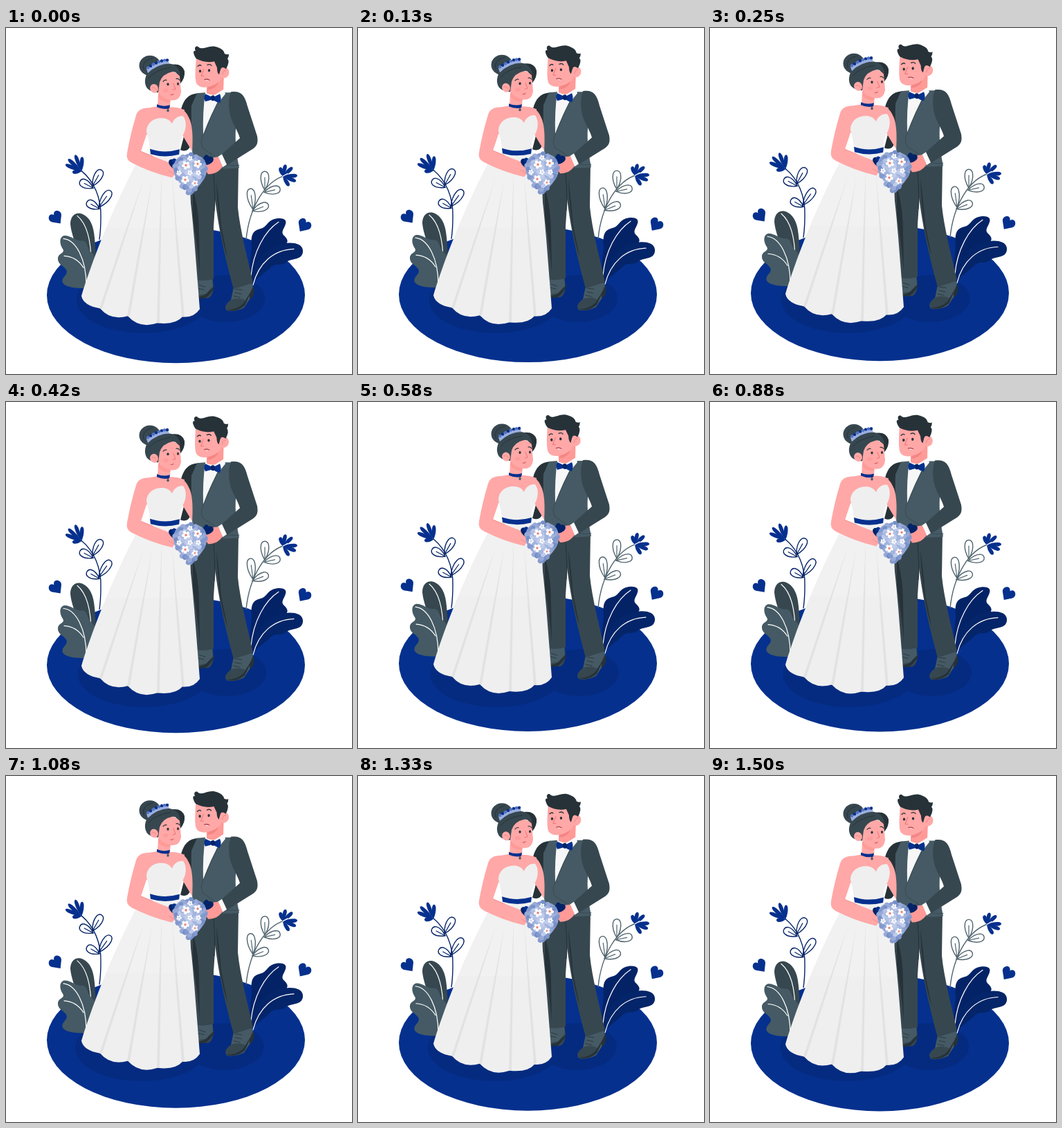
These frames come from a looping animation (500 px wide and 500 px high, 1.54 s). An HTML page with a canvas:

```html
<!DOCTYPE html>
<html lang="en">
<head>
<meta charset="utf-8">
<title>Wedding couple</title>
<style>
html, body { margin: 0; width: 100%; height: 100%; overflow: hidden; background: #fff; }
canvas { display: block; width: 500px; height: 500px; }
</style>
</head>
<body>
<canvas id="stage" width="500" height="500"></canvas>
<script>
const ctx = document.getElementById('stage').getContext('2d');
const LOOP = 1540, STEP = LOOP / 37, LOWEST = 1475, LIFT = 9;
const BLUE = '#05308e', SHADE = '#052b80', NAVY = '#042367', NAVY2 = '#042569';
const SLATE = '#455a64', DARK = '#37474f', BLACK = '#263238';
const SKIN = '#ffa8a7', BLUSH = '#ff9a97', DRESS = '#efefef', FOLD = '#e2e2e2';

const fill = (color, d) => { ctx.fillStyle = color; ctx.fill(new Path2D(d)); };
function line(color, width, d) {
  ctx.strokeStyle = color;
  ctx.lineWidth = width;
  ctx.lineCap = ctx.lineJoin = 'round';
  ctx.stroke(new Path2D(d));
}
function oval(color, x, y, rx, ry = rx, turn = 0) {
  ctx.fillStyle = color;
  ctx.beginPath();
  ctx.ellipse(x, y, rx, ry, turn, 0, Math.PI * 2);
  ctx.fill();
}
function at(x, y, turn, draw) {
  ctx.save();
  ctx.translate(x, y);
  ctx.rotate(turn);
  draw();
  ctx.restore();
}

// Teardrop running from a base point to a rounded tip.
function petal(x, y, tipX, tipY, width, paint) {
  const len = Math.hypot(tipX - x, tipY - y);
  at(x, y, Math.atan2(tipY - y, tipX - x), () => paint(
    `M0 0C${len * .3} ${-width * .45} ${len * .55} ${-width * .6} ${len * .8} ${-width * .5}` +
    `C${len * 1.07} ${-width * .35} ${len * 1.07} ${width * .35} ${len * .8} ${width * .5}` +
    `C${len * .55} ${width * .6} ${len * .3} ${width * .45} 0 0Z`, len));
}
function sprig(color, stem, leaves) {
  line(color, 1.4, stem);
  for (const [x, y, tx, ty] of leaves)
    petal(x, y, tx, ty, 11, (d, len) => {
      line(color, 1.4, d);
      line(color, 1.2, `M0 0L${len * .68} 0`);
    });
}
function bloom(x, y, tips) {
  for (const [tx, ty] of tips) petal(x, y, tx, ty, 5.4, d => fill(BLUE, d));
}
function heart(x, y, turn) {
  at(x, y, turn, () => fill(BLUE,
    'M0 11L-8.5 2C-13.5 -4 -4 -13 0 -4.5C4 -13 13.5 -4 8.5 2Z'));
}

function plants() {
  sprig(NAVY, 'M109 207C127 222 138 246 137 275Q137 292 135 306',
    [[125, 229, 138, 206], [126, 232, 107, 222], [134, 260, 151, 236], [135, 262, 117, 252]]);
  bloom(109, 208, [[96, 209], [86, 198], [90, 190], [100, 184], [110, 187]]);
  sprig('#50646e', 'M403 214C375 222 352 258 347 306',
    [[374, 235, 374, 208], [373, 238, 396, 233], [357, 263, 353, 233], [356, 265, 379, 256]]);
  bloom(400, 215, [[396, 202], [404, 198], [414, 202], [421, 214], [419, 222], [409, 229]]);
  line('#fff', 1.2, 'M400 215L407 211');
  heart(72, 274.5, -.65);
  heart(431, 285.5, .6);

  fill(DARK, 'M119 372C114 342 95 307 93 284C93 267 108 263 119 276C130 289 128 313 131 345Z');
  line('#fff', 1.2, 'M103 272C115 282 123 303 123 340');
  fill(SLATE, 'M121 376C105 378 86 376 82 369C79 360 91 358 87 350C83 344 74 342 75 333C76 326 86 326 82 320C78 314 76 304 83 301C92 299 101 309 109 308C117 307 117 317 121 323C127 328 132 334 129 345Z');
  line('#fff', 1.2, 'M83 305C101 307 116 334 116 373M84 330Q102 331 112 347');

  fill(NAVY, 'M350 369L355 319C354 304 354 294 367 291C377 289 377 280 387 277C397 274 407 276 404 284C402 291 397 295 401 300C407 305 410 311 401 315C389 320 384 329 379 338Z');
  line('#fff', 1.2, 'M394 281C374 294 357 324 354 360');
  fill(NAVY2, 'M353 374C354 342 370 327 382 319C397 309 428 307 429 322C430 337 412 333 405 339C398 346 390 339 382 347C374 355 363 361 353 374Z');
  line('#fff', 1.2, 'M416 320C387 321 365 340 357 372');
}

function groomBody() {
  fill(BLACK, 'M278 95C263 96 257 104 253 118L262 138L252 177Q262 181 266 172L280 150Z');
  fill(DARK, 'M274 364L298 362C301 375 300 388 292 391H274Z');
  fill(SLATE, 'M274 364L298 362L299 374Q293 381 289 385L275 387Z');
  fill(BLACK, 'M293 381L301 374L300 378Q293 388 288 391L276 392V389Q289 388 293 381Z');
  line(BLACK, .8, 'M279 372L288 375M278 377L286 379');

  fill(SLATE, 'M329 375L355 369Q360 379 356 387Q349 397 344 405Q332 411 319 409Q314 402 325 394Z');
  fill(DARK, 'M326 393Q340 389 348 396Q341 410 323 410Q310 405 326 393Z');
  fill(BLACK, 'M357 374Q361 382 355 391L352 392V387L345 402Q333 412 318 408Q334 408 343 399L353 383Z');
  line(BLACK, .8, 'M332 378L341 379M331 383L340 385M329 388L338 390');

  fill(DARK, 'M266 200H306L300 288V363Q288 368 268 364Z');
  fill(DARK, 'M298 198H336L335 260C338 292 349 332 357 369L329 378C320 345 308 300 301 240Z');
  fill(BLACK, 'M270 235Q279 260 279 300L280 355Q276 310 270 275Z');
  fill(BLACK, 'M304 222Q308 250 311 287L320 332Q307 296 304 222Z');
  line(BLACK, 1, 'M299 205Q303 232 301 265');

  fill('#f7f7f7', 'M284 96L316 91L316 120L285 160Z');
  fill(SLATE, 'M276 95L288 94Q284 122 285 155Q295 127 313 94L326 94L333 137Q329 165 337 203Q304 207 270 197Q267 134 268 113Z');
  line(DARK, .8, 'M313 95Q296 127 284 158Q280 166 285 175L302 186');
  line(DARK, .8, 'M309 195Q322 201 337 199');
  fill(DARK, 'M325 93C339 91 345 97 349 114L363 157C365 169 362 173 351 179L319 199L311 184L338 160C335 149 326 137 324 126C321 114 322 101 325 93Z');
  fill('#fafafa', 'M306 187L312 183L319 198L313 202Z');
  fill(BLUSH, 'M307 187L313 201C308 208 302 212 292 212L284 199Q294 187 307 187Z');
}

function groomHead(lift) {
  ctx.save();
  ctx.translate(306, 92);
  ctx.rotate(-.027 * lift);
  ctx.translate(-306, -92);
  fill(BLUSH, 'M290 76L315 68L314 92Q302 101 290 95Z');
  fill(SKIN, 'M275 42C274 57 272 76 276 82C282 90 298 86 308 80L317 60L307 40Z');
  fill('#f48685', 'M292 86Q303 83 308 78Q303 90 291 90Z');
  oval(SKIN, 315, 65, 7.5, 8, .25);
  line('#ef7f7f', .9, 'M313 68Q313 62 318 62');
  fill(BLACK, 'M275 45C270 38 270 32 274 34C271 28 276 25 279 29C286 33 295 23 307 29Q315 32 316 38Q321 40 322 38Q322 43 320 45Q324 49 318 60Q312 55 310 61L308 68Q305 66 305 58L301 49Q288 52 275 45Z');
  oval(BLACK, 280.5, 63, 1.7, 2.1);
  oval(BLACK, 293.5, 62, 1.7, 2.1);
  line(BLACK, 1.3, 'M277 56Q280 53 282 55M291 54Q295 52 297 55');
  line('#ef7474', 1, 'M286 60Q283 67 282 70L286 70');
  line('#a8424c', 1.3, 'M287 75Q291 74 294 76');
  line('#fff', .7, 'M289 76.2L293 76.8');
  ctx.restore();
  fill('#fafafa', 'M289 97L299 99L315 89L317 96L309 106L300 102L289 104Z');
  fill(BLUE, 'M299 101L288 96Q285 101 288 107L299 104Q303 108 309 109Q312 102 309 96Z');
  oval(NAVY, 299, 102, 3.2, 4, -.15);
}

function brideBody() {
  fill(SKIN, 'M240 116C254 115 260 119 266 134Q271 148 269 179Q260 164 254 154L239 135Z');
  fill(SKIN, 'M220 95H238L237 115Q248 115 258 119L258 147L203 155L195 179L238 196Q248 200 245 211L240 217Q207 209 181 195Q173 191 175 181Q180 153 188 127Q191 116 207 116L219 114Z');
  fill(DRESS, 'M203 151C203 137 215 131 223 131C232 130 237 134 240 139C242 132 249 127 256 128C262 136 260 148 256 155C251 165 250 169 251 181H208Q208 168 203 151Z');
  fill(DRESS, 'M209 180H251C262 210 267 243 272 305L280 407Q271 420 255 418Q245 430 219 427Q193 436 176 417Q151 424 136 406Q112 402 109 388C122 345 151 267 187 199Z');
  fill('rgba(255,255,255,.12)', 'M210 180H251Q265 220 271 290H143Q161 247 187 199Z');
  for (const [x, y, hx, hy] of [[200, 216, 136, 406], [212, 217, 176, 417], [225, 207, 219, 427], [240, 214, 255, 418]])
    fill(FOLD, `M${x} ${y}Q${(x + hx) / 2 + 2} ${(y + hy) / 2} ${hx + 3} ${hy}L${hx - 1} ${hy}Q${(x + hx) / 2 - 2} ${(y + hy) / 2} ${x} ${y}Z`);
  fill(SKIN, 'M194 179L238 196Q248 200 245 211L240 217Q207 209 181 195Z');
  line('#f18a89', .9, 'M195 179L212 186M235 207L243 212');
  fill(BLUE, 'M208 175.5Q229 182.5 251 176L250 183.5Q229 189 209 183Z');
}

function brideHead() {
  fill(BLUSH, 'M221 92L239 101L237 108Q226 109 220 101Z');
  oval(DARK, 208, 55, 15.5, 14.5);
  line(BLACK, .9, 'M199 61Q195 48 212 44');
  fill(BLACK, 'M236 54Q254 50 258 63Q259 73 252 81L248 68Z');
  fill(SKIN, 'M220 70Q239 57 251 70L253 93Q251 107 238 105Q223 102 219 91Z');
  fill(DARK, 'M201 80C200 63 215 51 232 52C245 52 251 58 252 70Q247 63 240 64Q226 67 222 79L220 94Q214 94 208 91Q202 88 201 80Z');
  line(BLACK, .9, 'M206 73Q216 61 237 58');
  oval(SKIN, 214, 88, 5.8, 6.5, -.35);
  line('#ef7f7f', .9, 'M211 87Q215 85 217 90');
  fill('#9aaee0', 'M203 60Q215 47 234 47L236 52Q218 53 205 66Z');
  for (let i = 0; i < 8; i++) {
    const u = i / 7;
    oval(i % 2 ? BLUE : '#5272bd', 205 + 28 * u, 58 - 11 * Math.sin(u * 1.57), 2.2);
  }
  oval(BLACK, 234, 82, 1.6, 2);
  oval(BLACK, 248.5, 81.5, 1.5, 2);
  line(BLACK, 1.2, 'M227 78Q229 75 232 76M246 74Q249 73 251 76');
  line('#ef7474', 1, 'M242 81L245 89L241 90');
  line('#d9616b', 1.2, 'M238 97Q240 98 242 96');
  oval('rgba(255,120,125,.25)', 231, 91, 4, 2.8);
  fill(BLUE, 'M218 111Q227 115 237 112L236 117Q227 119 218 115Z');
  line(NAVY, 1, 'M234 116V118');
  oval(SLATE, 234, 120, 1.7, 2);
}

function blossom(x, y, size, turn, heartColor) {
  at(x, y, turn, () => {
    for (let i = 0; i < 5; i++) {
      const a = i * Math.PI * .4;
      oval('#fff', Math.cos(a) * size * .6, Math.sin(a) * size * .6, size * .46, size * .36, a);
    }
    oval(heartColor, 0, 0, size * .3);
  });
}

function bouquet() {
  petal(246, 206, 237, 191, 8, d => fill(NAVY, d));
  petal(248, 200, 241, 190, 7, d => fill(BLUE, d));
  petal(284, 199, 299, 188, 9, d => fill(NAVY, d));
  petal(285, 193, 292, 185, 7, d => fill(NAVY2, d));
  fill('#8da2d2', 'M242 200Q246 182 266 184Q286 182 290 200Q292 213 282 225L268 242Q261 238 258 228Q241 220 242 200Z');
  const rim = ['#8399cd', '#97aad8', '#768fc8'], core = ['#b4c2e6', '#a3b4dd', '#c0cceb'];
  for (let i = 0; i < 60; i++) {
    const a = i * 2.399, r = Math.sqrt((59 - i) / 59);
    const y = Math.sin(a) * r, narrow = y > 0 ? 1 - y * y * .75 : 1;
    oval((r > .72 ? rim : core)[i % 3],
      265.5 + Math.cos(a) * r * 22 * narrow, 204 + y * (y > 0 ? 37 : 20), 4.3, 3.7, a);
  }
  for (const [x, y, s] of [[260, 199, 6], [277, 197, 5.8], [259, 220, 5.8], [273, 225, 4.6]])
    blossom(x, y, s, x * .2, '#ed8577');
  for (const [x, y] of [[250, 210], [266, 189], [278, 210], [266, 210]])
    blossom(x, y, 3.8, y, '#bdcaeb');
}

function draw(time) {
  const t = Math.floor((time % LOOP + 4) / STEP) * STEP;
  const lift = (1 - Math.cos((t - LOWEST) / LOOP * Math.PI * 2)) / 2;
  // The shadow drifts right steadily, then snaps back.
  const drift = 6.2 * ((t - 1000 + LOOP) % LOOP) / LOOP - 2.3;
  const rise = -LIFT * lift - .5;
  ctx.fillStyle = '#fff';
  ctx.fillRect(0, 0, 500, 500);
  oval(BLUE, 245.5, 386.7 + rise, 186.5, 98.2);
  oval(SHADE, 198 + drift, 393, 96, 48);
  oval(SHADE, 317.5 + drift, 391, 57, 34);
  ctx.save();
  ctx.translate(0, rise);
  plants();
  groomBody();
  groomHead(lift);
  brideBody();
  brideHead();
  bouquet();
  ctx.restore();
}

const start = performance.now();
function tick() {
  draw(performance.now() - start);
  requestAnimationFrame(tick);
}
tick();
</script>
</body>
</html>
```
